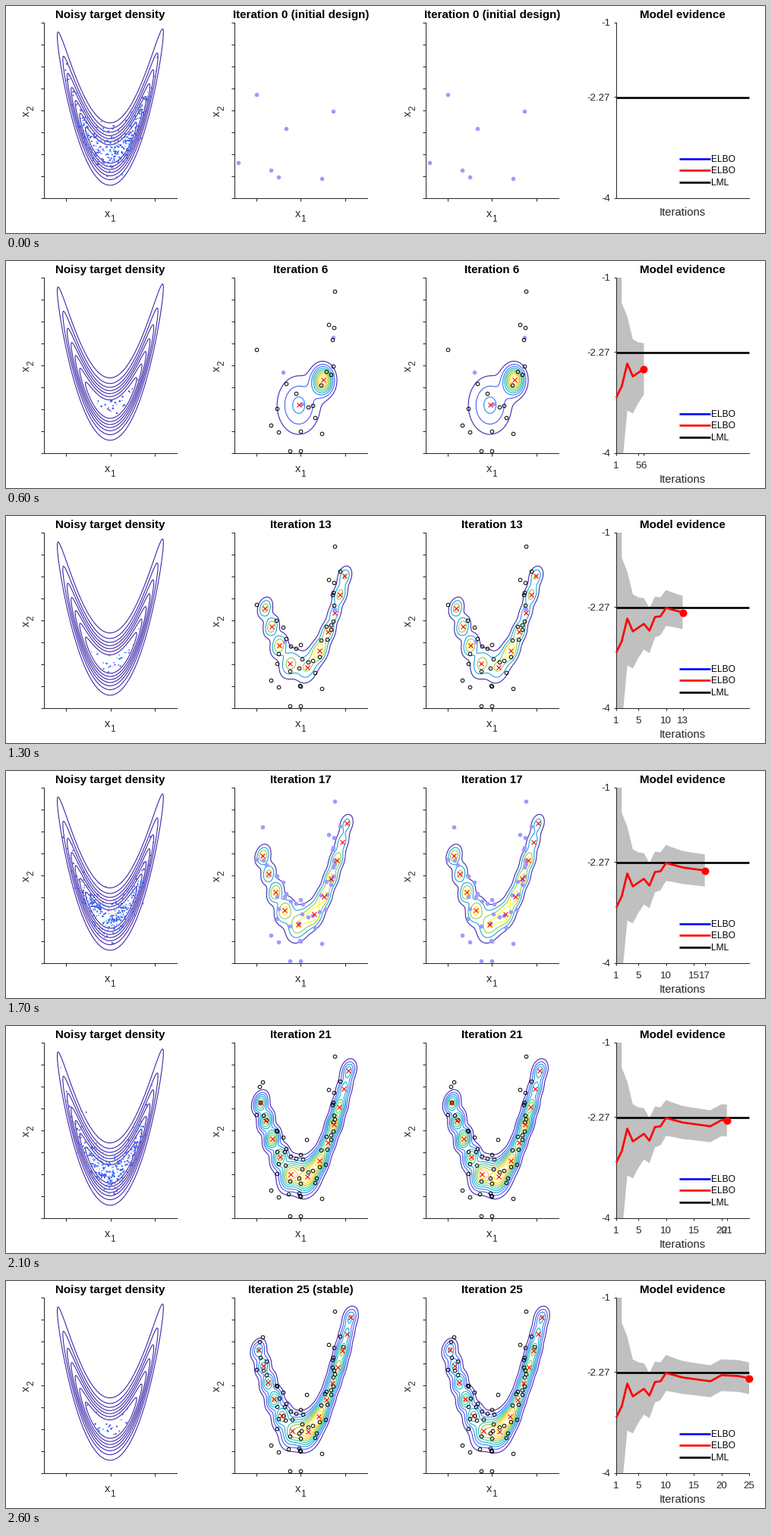
A matplotlib script that plays this animation: 1000 by 300 pixels, repeating every 3200 ms.

```python
import numpy as np
import matplotlib.pyplot as plt
from matplotlib.animation import FuncAnimation
from matplotlib.colors import LinearSegmentedColormap

plt.rcParams["font.family"] = "Liberation Sans"

INK = "#262626"
LIGHT = "#9c9cff"
TOP, BOTTOM, WIDTH = 22, 254, 175
UNIT = 29.1
LEFTS = [50, 301, 553, 804]
LAST = 25
WARMUP_END, SPARSE_END = 6, 17
REFRESHED = {0, SPARSE_END}
QUIET = {6, 13, 26}
PARULA = LinearSegmentedColormap.from_list("parula", [
    "#3e26a8", "#4659f5", "#2d87f7", "#12b1d6", "#38c897",
    "#81cc59", "#d1bf27", "#fec937", "#f9fb15"])

# Plane coordinates span x in [-3, 3] and y in [-2, 6].
PX, PY = np.meshgrid(np.linspace(-3, 3, 351), np.linspace(-2, 6, 465))


def to_pixels(left, x, y):
    return left + WIDTH / 2 + x * UNIT, 196.2 - y * 29


def banana(x, y):
    return np.exp(-(x * x - y) ** 2 - (x - 1) ** 2 / 100 - (x * x + y * y) / 18)


def design_points():
    """Initial design, then samples closing in on the ridge: (birth, x, y)."""
    rng = np.random.default_rng(4)
    initial = [(-2, 2.7), (1.48, 1.95), (-0.65, 1.15), (-2.82, -0.38),
               (-1.33, -0.72), (-1, -1.03), (0.95, -1.12)]
    points = [(0, x, y) for x, y in initial]
    for it in range(1, LAST + 1):
        reach = 1.5 + 0.8 * it / LAST
        spread = 0.5 + 1.2 * np.exp(-it / 8)
        for _ in range(3 if it <= WARMUP_END else 2):
            x = rng.uniform(-reach, reach)
            y = np.clip(x * x + rng.normal(0, spread), -1.9, 5.8)
            points.append((it, x, y))
    return np.array(points)


def chain(it):
    """Component centres at even steps along the ridge, reaching out over time."""
    start, end = -1.28 - 0.025 * it, 1.73 + 0.021 * it
    x = np.linspace(start, end, 400)
    arc = np.cumsum(np.hypot(1, 2 * x))
    count = 9 + (it - 10) // 3
    x = np.interp(np.linspace(arc[0], arc[-1], count), arc, x)
    return x, x * x - 0.25 * np.exp(-x * x)


def posterior(it):
    """Centres, normalised density and contour levels of the mixture."""
    if it <= WARMUP_END:
        settle = it / WARMUP_END
        x = np.array([0.7 + 0.32 * settle, -0.2 + 0.12 * settle])
        y = np.array([1.05 + 0.27 * settle, 0.18])
        sx, sy, rho = 9, 12.2, 0
        scales, heights = [1.9 - 0.95 * settle, 2.05], [1, 0.34]
        steps = 10
    else:
        rng = np.random.default_rng(it)
        x, y = chain(it)
        sx, sy, rho = 7, 10, -0.25
        scales = 0.9 + 0.6 * np.exp(-2 * x * x)
        heights = banana(x, y) ** 0.4 * rng.uniform(0.65, 1, len(x))
        steps = 5 if it <= SPARSE_END else 10
    density = 0
    for cx, cy, scale, height in zip(x, y, scales, heights):
        u = (PX - cx) * UNIT / (sx * scale)
        v = (PY - cy) * 29 / (sy * scale)
        q = (u * u + 2 * rho * u * v + v * v) / (1 - rho * rho)
        density = density + height * np.exp(-q / 2)
    return x, y, density / density.max(), np.arange(1, steps) / steps


def evidence():
    """Evidence estimate and its half band, in pixels, per iteration."""
    n = np.arange(1, LAST + 1)
    estimate = np.interp(n, [1, 2, 3, 4, 6, 7, 8, 9, 10, 13, 18, 20, 23, 25],
                         [181, 166, 136, 153, 143, 152, 134, 133, 122, 128,
                          133, 125, 126, 129])
    half = 21 + 130 * np.exp(-n / 2.6) + np.where(n == 1, 4000, 0)
    half[1] += 29
    return estimate, half


POINTS = design_points()
ELBO, HALF_BAND = evidence()

fig = plt.figure(figsize=(10, 3), dpi=100, facecolor="white")
ax = fig.add_axes([0, 0, 1, 1])


def pt(pixels):
    return pixels * 0.72


def text(x, y, string, size, color=INK, ha="center", **style):
    ax.text(x, y, string, fontsize=pt(size), color=color, ha=ha, va="baseline",
            rotation_mode="anchor", **style)


def line(xs, ys, color=INK, width=1, **style):
    style.setdefault("solid_capstyle", "butt")
    ax.plot(xs, ys, color=color, lw=pt(width), **style)


def title(left, string):
    text(left + 87.8, 16.3, string, 15.1, "black", weight="bold")


def frame_axes(left):
    line([left, left], [TOP, BOTTOM], solid_capstyle="projecting")
    line([left, left + WIDTH], [BOTTOM, BOTTOM], solid_capstyle="projecting")


def draw_plane(left):
    frame_axes(left)
    for i in range(9):
        line([left - 4, left], [TOP + 29 * i] * 2)
    for i in (1, 3, 5):
        x = round(left + i * WIDTH / 6)
        line([x, x], [BOTTOM, BOTTOM + 4])
    text(left + 80, 279.3, "x", 14.67, ha="left")
    text(left + 88, 285.3, "1", 11.7, ha="left")
    text(left - 18.8, 146, "x", 14.67, ha="left", rotation=90)
    text(left - 13, 138.5, "2", 11.7, ha="left", rotation=90)


def draw_target(state):
    left = LEFTS[0]
    draw_plane(left)
    title(left, "Noisy target density")
    ax.contour(*to_pixels(left, PX, PY), banana(PX, PY),
               levels=0.1175 * np.arange(1, 8), colors="#3e26a8", linewidths=pt(1.1))
    rng = np.random.default_rng(100 + state)
    count = 9000
    x, y = rng.uniform(-2.4, 2.4, count), rng.uniform(-1.2, 5.5, count)
    power, limit = (14, 26) if state in QUIET else (2.4, 320)
    keep = np.flatnonzero(rng.random(count) < banana(x, y) ** power)[:limit]
    colors = np.where(rng.random(len(keep)) < 0.75, "#4459ee", "#2d87f7")
    sizes = rng.uniform(1.2, 2.7, len(keep))
    ax.scatter(*to_pixels(left, x[keep], y[keep]), s=pt(sizes) ** 2, c=colors,
               linewidths=0, zorder=3)


def draw_samples(it, left):
    # The far left starting point is dropped after the initial design.
    shown = (POINTS[:, 0] <= it) & ((POINTS[:, 1] > -2.5) | (it == 0))
    birth, x, y = POINTS[shown].T
    x, y = to_pixels(left, x, y)
    fresh = ((birth == it) & (it <= SPARSE_END)) | (it in REFRESHED)
    ax.plot(x[fresh], y[fresh], "o", ms=pt(5.6), color=LIGHT, mew=0, zorder=2.5)
    ax.plot(x[~fresh], y[~fresh], "o", ms=pt(4.6), mfc="none", mec="black",
            mew=pt(1), zorder=2.5)


def draw_posteriors(it, final):
    suffixes = [" (stable)" if final else "", ""]
    if it == 0:
        suffixes = [" (initial design)"] * 2
    for left, suffix in zip(LEFTS[1:3], suffixes):
        draw_plane(left)
        title(left, f"Iteration {it}{suffix}")
        draw_samples(it, left)
        if it:
            x, y, density, levels = posterior(it)
            ax.contour(*to_pixels(left, PX, PY), density, levels=levels, cmap=PARULA,
                       vmin=levels[0], vmax=levels[-1], linewidths=pt(1.1))
            ax.plot(*to_pixels(left, x, y), "x", ms=pt(6), color="red",
                    mew=pt(1.1), zorder=4)


def draw_evidence(it):
    left = LEFTS[3]
    frame_axes(left)
    title(left, "Model evidence")
    lml = 120.5
    for y, label in ((TOP, "-1"), (lml, "-2.27"), (BOTTOM, "-4")):
        line([left - 3, left], [y, y])
        text(left - 7.5, y + 5, label, 13.33, ha="right")
    line([left, left + WIDTH], [lml + 0.5] * 2, "black", 2.67, zorder=2.2)
    if it:
        x = left + 0.5 + np.arange(it) * WIDTH / (LAST - 1)
        elbo, half = ELBO[:it], HALF_BAND[:it]
        band = ax.fill_between(x, elbo - half, elbo + half, color="#c0c0c0",
                               lw=0, zorder=1)
        band.set_clip_path(plt.Rectangle((left, TOP), WIDTH + 1, BOTTOM - TOP,
                                         transform=ax.transData))
        line(x, elbo, "red", 2.67, zorder=3, solid_joinstyle="round")
        ax.plot(x[-1], elbo[-1], "o", ms=pt(10), color="red", mew=0, zorder=4)
        for n in sorted({1, it} | set(range(5, it, 5))):
            line([x[n - 1]] * 2, [BOTTOM, BOTTOM + 3])
            text(x[n - 1], 274, str(n), 13.33)
    text(left + 88, 293.3 if it else 277.3, "Iterations", 14.8)
    for y, color, label in ((202, "blue", "ELBO"), (217.5, "red", "ELBO"),
                            (233.5, "black", "LML")):
        line([887.5, 928], [y, y], color, 2.67)
        text(930, y + 4.3, label, 12, "black", ha="left")


def update(k):
    state = min(k, LAST + 1)
    it = min(state, LAST)
    ax.clear()
    ax.set_axis_off()
    draw_target(state)
    draw_posteriors(it, state > LAST)
    draw_evidence(it)
    ax.set_xlim(0.5, 1000.5)
    ax.set_ylim(300.5, 0.5)


anim = FuncAnimation(fig, update, frames=32, interval=100, repeat=True, repeat_delay=0)
plt.show()
```
